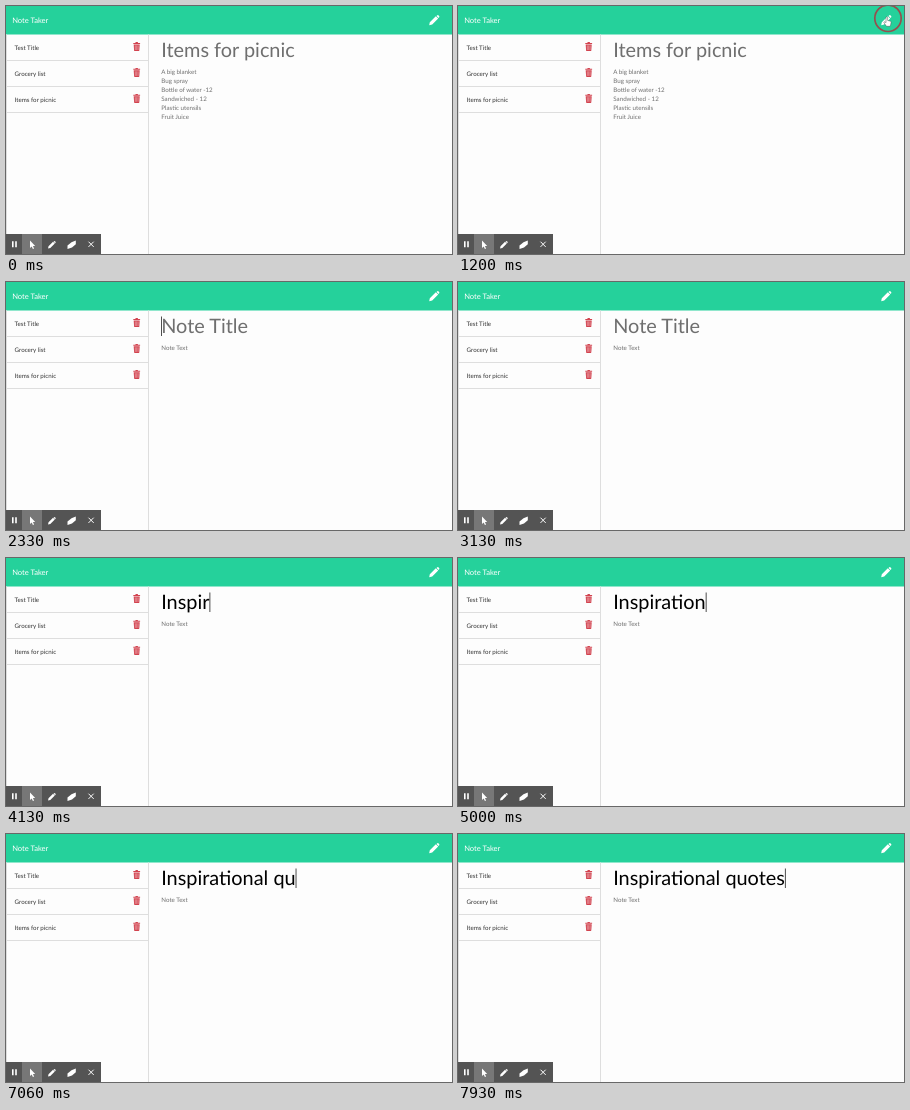
Animation, 446 px wide and 248 px high, one loop 8 s. Source, as an HTML page:

```html
<!DOCTYPE html>
<html lang="en">
<head>
<meta charset="utf-8">
<title>Note Taker</title>
<style>
  html, body { margin: 0; width: 100%; height: 100%; overflow: hidden; background: #fdfdfd; }
  svg { display: block; width: 446px; height: 248px; }
  text { font-family: Lato, sans-serif; font-size: 6.2px; text-rendering: geometricPrecision; white-space: pre; }
  .brand { font-size: 7.6px; fill: #fff; }
  .item { fill: #333; }
  .title { font-size: 19.9px; }
  .soft { fill: #6f6f6f; }
  .rule { stroke: #dedede; fill: none; }
</style>
</head>
<body>
<svg viewBox="0 0 446 248">
  <defs>
    <g id="bin">
      <path fill="#d2434f" d="M-3.4-3.6h2l.4-.8h2l.4.8h2v1h-6.8zM-3-2.1h6l-.4 6q0 .7-.7.7h-3.8q-.7 0-.7-.7z"/>
      <path stroke="#f3c5c9" stroke-width=".55" d="M-1.4-1.1v4.6M0-1.1v4.6M1.4-1.1v4.6"/>
    </g>
    <g id="pen">
      <path d="M-5 5l.6-3 6-6 2.4 2.4-6 6zM2.3-4.2l.8-.7q.6-.5 1.1 0l.8.9q.5.6 0 1.1l-.6.8z"/>
    </g>
  </defs>

  <rect width="446" height="248" fill="#fdfdfd"/>
  <rect width="446" height="28.5" fill="#25d19b"/>
  <text class="brand" x="6.2" y="17.2">Note Taker</text>
  <use href="#pen" x="428.2" y="14.2" fill="#fff"/>

  <path class="rule" d="M142.5 28.5V248M.5 28.5V228M0 54.5H142M0 80.5H142M0 106.5H142"/>
  <g id="list"></g>

  <text class="title" id="title" x="155.2" y="51.4"></text>
  <rect id="caret" y="34.5" width=".8" height="19.5" fill="#222"/>
  <g id="body"></g>

  <g id="bar" fill="#fff">
    <rect y="228" width="95" height="20" fill="#545454"/>
    <rect x="16" y="228" width="20" height="20" fill="#777"/>
    <path d="M6 235.3h1.6v6H6zM9.2 235.3h1.6v6H9.2z"/>
    <path d="M24 234.6v7.3l1.7-1.5 1.2 2.7 1.2-.5-1.2-2.7h2.3z"/>
    <use href="#pen" transform="translate(45.8 238.8) scale(.75)"/>
    <path d="M61.5 239.6l4-3.4 4.3-1.6v3.6l-3.8 3.4-4.5 1.4z"/>
    <path d="M82.5 235.7l5.2 5.2m0-5.2l-5.2 5.2" stroke="#fff" stroke-width="1"/>
  </g>

  <circle id="ring" cx="430" cy="12.3" fill="none" stroke="#94504f" stroke-width="1.7"/>
  <path id="hand" fill="#fff" stroke="#444" stroke-width=".45" stroke-linejoin="round"
    d="M-.8.4Q0-.5.8.4V3.6l2.6.7q1 .3.9 1.3l-.5 2.6-.5 1.3H-.3L-2.9 5.9q-.2-1 .8-.9L-.8 5.8z"/>
</svg>

<script>
const LOOP = 8000, BLINK = 500;
const $ = id => document.getElementById(id);
const label = (x, y, cls, s) => `<text class="${cls}" x="${x}" y="${y}">${s}</text>`;

$("list").innerHTML = ["Test Title", "Grocery list", "Items for picnic"].map((s, i) => {
  const y = 40.5 + 25.9 * i;
  return label(8.6, y + 3.4, "item", s) + `<use href="#bin" x="130.7" y="${y}"/>`;
}).join("");

const picnic = {
  title: "Items for picnic",
  lines: ["A big blanket", "Bug spray", "Bottle of water -12", "Sandwiched - 12", "Plastic utensils", "Fruit Juice"]
};
const blank = { title: "Note Title", lines: ["Note Text"] };

const typed = "Inspirational quotes";
const keys = [3330, 3530, 3660, 3800, 4000, 4130, 4260, 4400, 4530, 4730, 4860, 5130, 5260,
  6660, 6860, 7000, 7130, 7400, 7530, 7730];
const OPEN = 1330, FOCUS = 2300;

// Pointer stops: time, x, y of the fingertip
const path = [[460, 412, 32], [860, 428.8, 10.8], [1400, 428.8, 10.8], [1660, 414.6, 18.2], [1730, 414.6, 18.2]];
const ease = k => k * k * (3 - 2 * k);

function pointer(t) {
  const i = path.findIndex(p => p[0] > t);
  if (i < 1) return null;
  const [t0, x0, y0] = path[i - 1], [t1, x1, y1] = path[i];
  const k = ease((t - t0) / (t1 - t0));
  return [x0 + (x1 - x0) * k, y0 + (y1 - y0) * k];
}

const show = (el, on) => el.setAttribute("visibility", on ? "visible" : "hidden");
let shown = null;

function setNote(note) {
  if (note === shown) return;
  shown = note;
  $("body").innerHTML = note.lines.map((s, i) => label(155.3, 67.6 + 9.05 * i, "soft", s)).join("");
}

function draw(t) {
  const note = t < OPEN ? picnic : blank;
  const count = keys.filter(k => k <= t).length;
  const title = $("title");
  setNote(note);
  title.textContent = count ? typed.slice(0, count) : note.title;
  title.setAttribute("fill", count ? "#000" : "#6f6f6f");

  const last = count ? keys[count - 1] : FOCUS;
  show($("caret"), t >= FOCUS && Math.floor((t - last) / BLINK) % 2 === 0);
  $("caret").setAttribute("x", 155.2 + (count ? title.getComputedTextLength() : 0));

  const ring = (t - 1060) / 270;
  show($("ring"), ring >= 0 && ring < 1);
  $("ring").setAttribute("r", 8 + 5.2 * Math.min(1, Math.max(0, ring * 2)));

  const at = pointer(t);
  show($("hand"), at);
  if (at) $("hand").setAttribute("transform", `translate(${at})`);
}

const start = performance.now();
function tick() {
  draw((performance.now() - start) % LOOP);
  requestAnimationFrame(tick);
}
tick();
</script>
</body>
</html>
```
